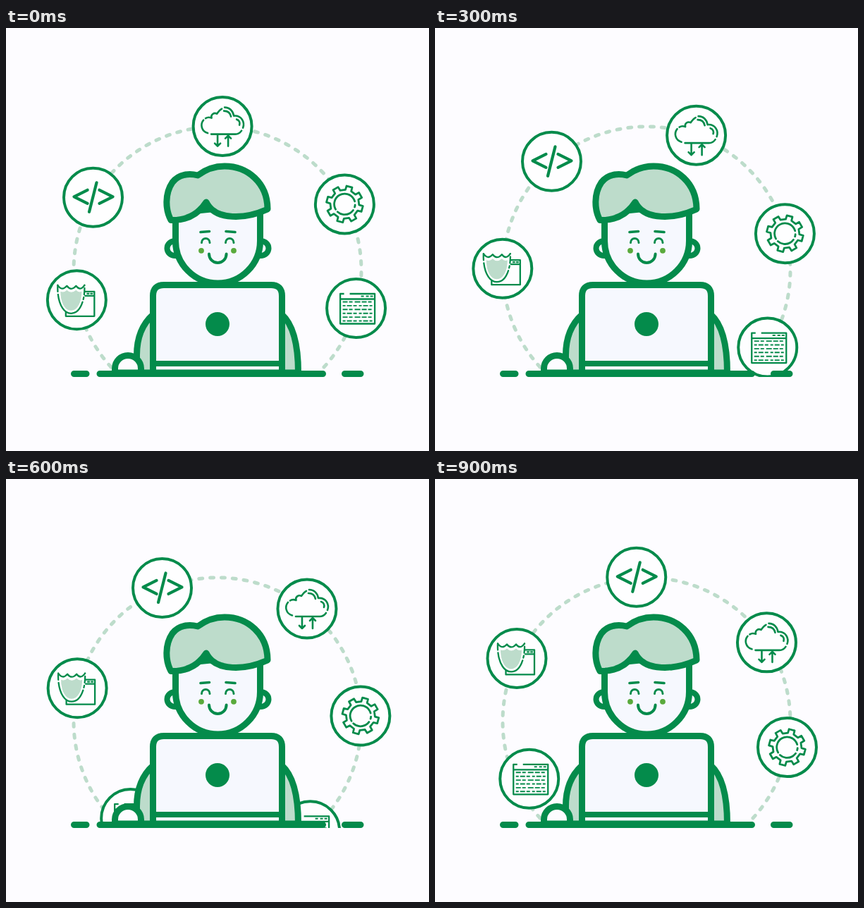
An HTML page for the animation above (1 s loop, 600x600 px).

```html
<!DOCTYPE html>
<html lang="en">
<head>
<meta charset="utf-8">
<title>Developer at work</title>
<style>
  html, body { margin: 0; width: 100%; height: 100%; overflow: hidden; background: #fdfcff; }
  svg { display: block; width: 100vw; height: 100vh; }
  .line { fill: none; stroke: #048b4b; stroke-linecap: round; stroke-linejoin: round; }
  .bold { stroke-width: 9; }
  .skin { fill: #f6f8fe; }
  .tint { fill: #bddccb; }
  .solid { fill: #048b4b; }
</style>
</head>
<body>
<svg viewBox="0 0 600 600">
  <defs>
    <clipPath id="above"><rect width="600" height="495"/></clipPath>

    <g id="code" class="line" stroke-width="4.2">
      <path d="M-8-10.5 L-27-1 L-8 8.5 M5-21 L-5.5 20.5 M9-10.5 L28-1 L9 8.5"/>
    </g>

    <g id="cloud" class="line" stroke-width="2.6">
      <path d="M-21 9.500C-30 7-32-3-27-9M-24-11.500C-21-13.500-18-13-15.500-12C-17-17-12-20-8-18C-5-22-3-24-1-25"/>
      <path d="M3-27C10-27 15-22 16-15C27-16 32-6 29 2M27 6C25 9 22 11 18 11H-16"/>
      <path d="M2-22C8-22 11-19 12-14M20-10C24-9 25-5 24-2"/>
      <path d="M-7 12V28M-11 24L-7 28L-3 24M8 28V13M4 17L8 13L12 17"/>
    </g>

    <g id="gear" class="line" stroke-width="2.8">
      <path id="teeth"/>
      <circle r="14.8" stroke-dasharray="50 5 3 5 25 5" transform="rotate(150)"/>
    </g>

    <g id="page" class="line" stroke-width="2.3" style="stroke-linecap:butt">
      <path d="M-17-20.500H-22.500V22H26.500V-20.500H-9M-22.500-13H26.500"/>
      <path stroke-width="2" d="M7-17H11M14-17H18M20-17H24"/>
      <g id="rows" stroke-width="1.9"></g>
    </g>

    <g id="shield" class="line" stroke-width="2.3">
      <path d="M12-12H25V23H-15.500V14M12-6H25"/>
      <path d="M15-9H17M20-9H22"/>
      <path fill="#fff" stroke="none" d="M-27-21Q-21-12-14-20Q-8-12-1-20Q5-12 11-21C12 2 4 19-8 19S-28 2-27-21Z"/>
      <path class="tint" stroke="none" d="M-23-12Q-18-10-14-14Q-8-8-1-14Q3-10 7-12C7 3 1 15-8 15S-23 3-23-12Z"/>
      <path d="M-27-21Q-21-12-14-20Q-8-12-1-20Q5-12 11-21"/>
      <path d="M-27-21C-28 2-20 19-8 19S12 2 11-21" stroke-dasharray="9 4 60 4 3 4"/>
    </g>
  </defs>

  <rect width="600" height="600" fill="#fdfcff"/>
  <path d="M149 481A204 204 0 1 1 451 481" pathLength="949" fill="none" stroke="#bddccb"
        stroke-width="5" stroke-linecap="round" stroke-dasharray="5 11"/>
  <g id="orbit" clip-path="url(#above)"></g>

  <g class="line bold">
    <path class="tint" d="M209 406C192 421 185.500 440 185.500 464V489H209Z"/>
    <path class="tint" d="M391 406C408 421 414.500 450 414.500 489H391Z"/>
    <g class="skin" stroke-width="8">
      <ellipse cx="240" cy="312.500" rx="11.500" ry="10.500"/>
      <ellipse cx="361" cy="312.500" rx="11.500" ry="10.500"/>
    </g>
    <path class="skin" d="M240.500 262V302A60 60 0 0 0 360.500 302V250Z"/>
    <path class="tint" d="M234 272.500C226 258 225 235 236 219C245 207 260 206 272 209C284 200 297 196 310 196C343 196 371 220 371 257C341 271 297 274 284 247C271 267 253 273 234 272.500Z"/>
    <path class="skin" d="M208.500 489V380Q208.500 364.500 224 364.500H376Q391.500 364.500 391.500 380V489Z"/>
    <path stroke-width="8" d="M210 476H390" style="stroke-width:8"/>
    <path fill="#fdfcff" style="fill:#fdfcff" d="M154.500 489V483A18.500 18.500 0 0 1 191.500 483V489Z"/>
    <path d="M133 490.500H449.500M96.500 490.500H114M480.500 490.500H503"/>
  </g>
  <g class="line" stroke-width="3.6">
    <path d="M276 289.500L288.500 288.500M312 288.500L325 289.500"/>
    <path stroke-width="3" d="M277.500 304.500C277.500 296.500 289 296.500 289 304.500M311.500 304.500C311.500 296.500 323 296.500 323 304.500"/>
    <path stroke-width="4" d="M288 320.500A12.300 12.500 0 0 0 312.600 320.500"/>
  </g>
  <g fill="#5aaa3c">
    <circle cx="277" cy="315.800" r="3.900"/>
    <circle cx="323" cy="315.800" r="3.900"/>
  </g>
  <circle class="solid" cx="300" cy="420" r="17"/>
</svg>

<script>
  const NS = "http://www.w3.org/2000/svg";
  const LOOP = 1000, STEP = 100;
  const CX = 300, CY = 343;
  const $ = id => document.getElementById(id);

  function add(parent, tag, attrs) {
    const node = document.createElementNS(NS, tag);
    for (const key in attrs) node.setAttribute(key, attrs[key]);
    return parent.appendChild(node);
  }

  // Angles are degrees clockwise from the top; speed is degrees per step.
  const polar = (deg, r) => {
    const a = deg * Math.PI / 180;
    return [r * Math.sin(a), -r * Math.cos(a)];
  };

  function gearPath(teeth, inner, outer, tilt) {
    const points = [];
    for (let i = 0; i < teeth; i++) {
      const mid = tilt + i * 360 / teeth;
      for (const [offset, r] of [[-12, inner], [-9, outer], [9, outer], [12, inner]]) {
        points.push(polar(mid + offset, r).map(v => v.toFixed(2)).join(" "));
      }
    }
    return "M" + points.join("L") + "Z";
  }

  $("teeth").setAttribute("d", gearPath(8, 20.5, 26, 15));
  for (let i = 0; i < 6; i++) {
    add($("rows"), "path", {
      d: `M-19 ${-9 + i * 5.4}H23`,
      "stroke-dasharray": i % 2 ? "4 2 7 2 5 3" : "7 2 5 3 8 2"
    });
  }

  const badges = [
    { icon: "page", start: 105.5, speed: 5.72, r: 204 },
    { icon: "page", start: 177.7, speed: 7.33, r: 185.5 },
    { icon: "shield", start: 257.9, speed: 4.2, r: 204.2 },
    { icon: "code", start: 300.2, speed: 6.2, r: 204.2 },
    { icon: "cloud", start: 2, speed: 6.1, r: 203.5 },
    { icon: "gear", start: 62.7, speed: 4.22, r: 203 }
  ];

  for (const badge of badges) {
    badge.node = add($("orbit"), "g", {});
    add(badge.node, "circle", { r: 41.5, class: "line", "stroke-width": 4, style: "fill:#fefeff" });
    add(badge.node, "use", { href: "#" + badge.icon });
  }

  function draw(ms) {
    const step = Math.floor((ms % LOOP) / STEP);
    for (const { node, start, speed, r } of badges) {
      const [x, y] = polar(start + speed * step, r);
      node.setAttribute("transform", `translate(${(CX + x).toFixed(2)} ${(CY + y).toFixed(2)})`);
    }
  }

  const begin = performance.now();
  function tick() {
    draw(performance.now() - begin);
    requestAnimationFrame(tick);
  }
  tick();
</script>
</body>
</html>
```
